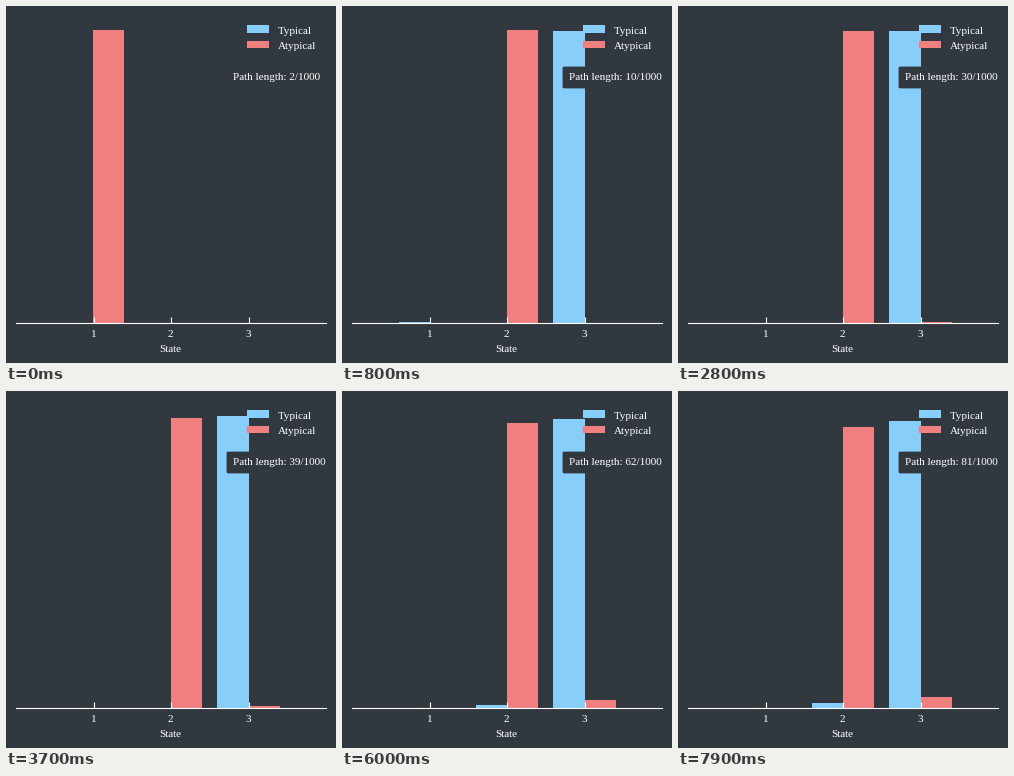
A matplotlib script for the animation above (8000 ms loop, 330x357 px).

```python
import numpy as np
import matplotlib.pyplot as plt
from matplotlib.animation import FuncAnimation
from matplotlib.patches import FancyBboxPatch, Rectangle

W, H, DPI = 330, 357, 100
BG, BLUE, CORAL = "#32383f", "lightskyblue", "lightcoral"
BASE, FULL = 317.3, 293.3
FRAMES, INTERVAL = 80, 100

plt.rcParams.update({"font.family": "Liberation Serif", "font.size": 8,
                     "text.color": "white", "text.kerning_factor": 6})

fig = plt.figure(figsize=(W / DPI, H / DPI), dpi=DPI, facecolor=BG)
ax = fig.add_axes([0, 0, 1, 1])
ax.set(xlim=(0, W), ylim=(H, 0))
ax.axis("off")


def rect(x0, y0, x1, y1, color, z):
    return ax.add_patch(Rectangle((x0, y0), x1 - x0, y1 - y0,
                                  facecolor=color, linewidth=0, zorder=z))


def line(xs, ys, cap="butt"):
    ax.plot(xs, ys, color="white", lw=0.8, zorder=3, solid_capstyle=cap)


def label(x, y, s, ha="left"):
    return ax.text(x, y, s, ha=ha, va="baseline", zorder=6)


def bars(spans, color, z):
    return [rect(a, BASE, b, BASE, color, z) for a, b in spans]


typical = bars([(57, 88), (134, 165), (211, 243)], BLUE, 1)
atypical = bars([(87, 118), (165, 196), (243, 274)], CORAL, 2)

# Axis
line([10.2, 320.2], [317.2, 317.2], "projecting")
for state, x in enumerate((88.2, 165.2, 243.2), 1):
    line([x, x], [311.2, 317.2])
    label(x - 0.8, 331, str(state), "center")
label(164.4, 346, "State", "center")

# Legend
for name, color, top, bottom in (("Typical", BLUE, 19, 27),
                                 ("Atypical", CORAL, 35, 42)):
    rect(241, top, 263, bottom, color, 5)
    label(272, bottom + 1, name)

# Counter
ax.add_patch(FancyBboxPatch((220.6, 60.6), W - 220.6, 21.8,
                            boxstyle="round,pad=0,rounding_size=1.5",
                            facecolor=BG, linewidth=0, zorder=4))
counter = label(227, 74, "")


def set_heights(group, shares):
    for bar, share in zip(group, shares):
        bar.set_y(BASE - FULL * share)
        bar.set_height(FULL * share)


def typical_shares(n):
    if n < 3:
        return 0, 0, 0
    first = 0.48 ** (n - 2)
    leak = np.interp(n, [9, 15, 21, 28, 39, 52, 72, 81],
                     [0, 1, 1.3, 0.6, 0.6, 2.2, 5.2, 5.7]) / FULL
    return first, leak, 1 - first - leak


def atypical_shares(n):
    first = 0.4117 ** (n - 2)
    leak = np.interp(n, [14, 21, 39, 52, 72, 81],
                     [0, 0.3, 2.6, 5.2, 10.6, 11.6]) / FULL
    return first, 1 - first - leak, leak


def update(i):
    n = i + 2
    set_heights(typical, typical_shares(n))
    set_heights(atypical, atypical_shares(n))
    counter.set_text(f"Path length: {n}/1000")
    return [*typical, *atypical, counter]


anim = FuncAnimation(fig, update, frames=FRAMES, interval=INTERVAL,
                     repeat=True, repeat_delay=0, blit=False)
plt.show()
```
